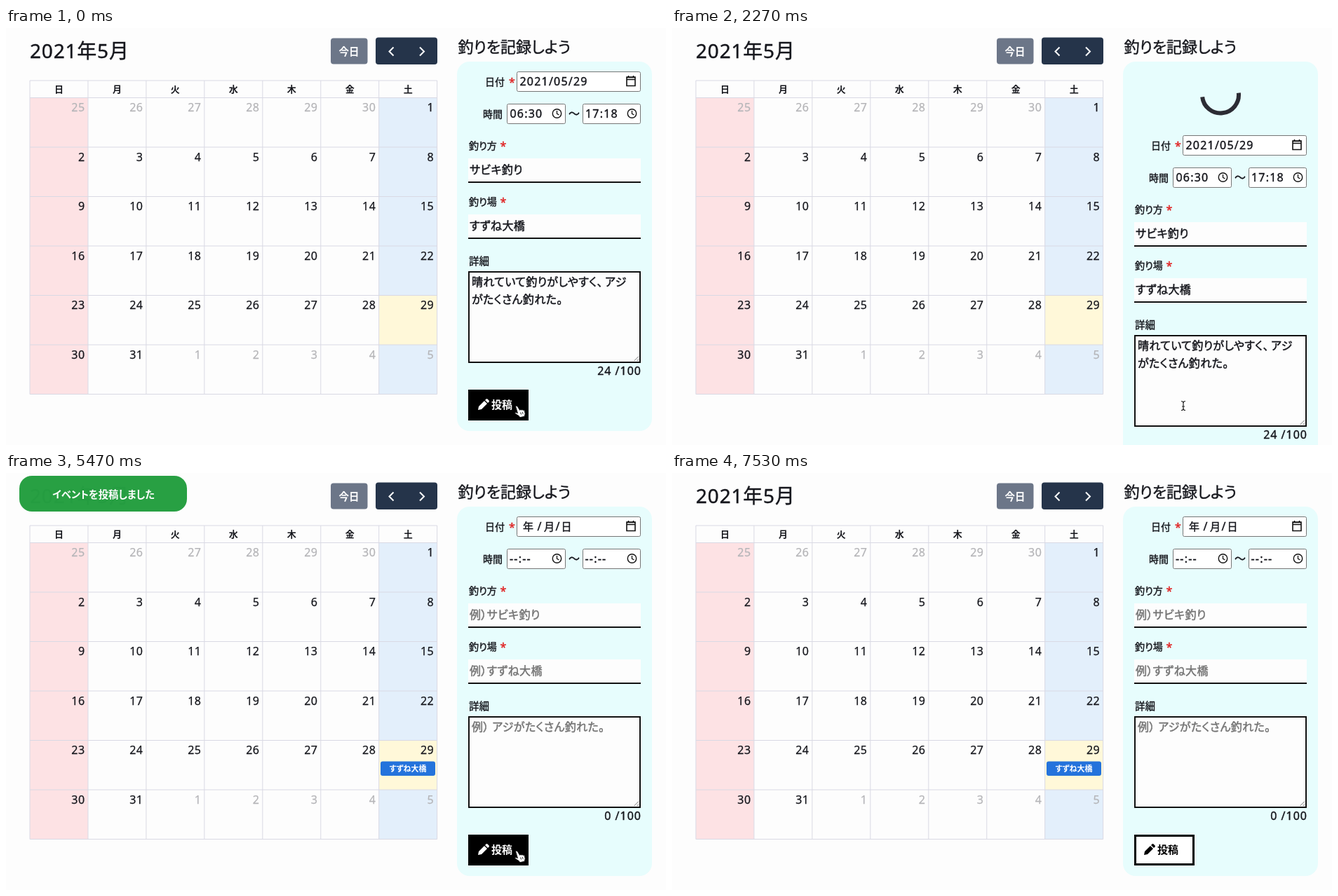
Recreate the animation shown at these times as an HTML page. Size 941 by 595 pixels, loop 7.56 s.

```html
<!DOCTYPE html>
<html lang="ja">
<head>
<meta charset="utf-8">
<style>
  html, body { margin: 0; width: 100%; height: 100%; overflow: hidden; background: #fdfdfd; }
  svg { display: block; width: 100%; height: 100%; color: #16171d; }
  text {
    font-family: "Noto Sans", "Noto Sans CJK JP", "Noto Sans CJK", sans-serif;
    font-feature-settings: "palt"; white-space: pre;
    fill: currentColor; stroke: currentColor; stroke-width: .4px;
  }
  .field { letter-spacing: .35px; stroke-width: .5px; }
  .wide { letter-spacing: 1.2px; }
  .count { letter-spacing: 1px; text-anchor: end; }
  .day { letter-spacing: .4px; text-anchor: end; stroke-width: .25px; }
  .grey { color: #757575; }
  .pale { color: #b5b5b8; }
  .red { color: #e02020; }
  .bold { font-weight: 700; stroke: none; }
  .middle { text-anchor: middle; }
  .white { color: #fff; }
</style>
</head>
<body>
<svg id="stage" viewBox="0 0 941 595"></svg>
<script>
const LOOP = 7560, LOAD = 1150, DONE = 3400, EVENT = 4300, FADE = 5340, FADE_MS = 1600, LEAVE = 6400;
const PLACE = 'すずね大橋';

const text = (x, y, size, str, cls = '') =>
  `<text x="${x}" y="${y}" font-size="${size}" class="${cls}">${str}</text>`;
const rect = (x, y, w, h, fill, attrs = '') =>
  `<rect x="${x}" y="${y}" width="${w}" height="${h}" fill="${fill}" ${attrs}/>`;
const line = (d, color, width) =>
  `<path d="${d}" fill="none" stroke="${color}" stroke-width="${width}"/>`;
const group = (id, body) => `<g id="${id}">${body}</g>`;
const onColor = 'white bold middle';

function calendar() {
  const left = 34, top = 99.5, colW = 82.95, rowH = 70.5;
  const right = left + 7 * colW, bottom = top + 6 * rowH;
  let out = rect(left, top, colW, 6 * rowH, '#fde2e4') +
    rect(left + 6 * colW, top, colW, 6 * rowH, '#e3effb') +
    rect(left + 6 * colW, top + 4 * rowH, colW, rowH, '#fff8d9');
  let grid = `M${left} 75H${right}`;
  for (let r = 0; r < 7; r++) grid += `M${left} ${top + r * rowH}H${right}`;
  for (let c = 0; c < 8; c++) grid += `M${left + c * colW} 75V${bottom}`;
  out += line(grid, '#d9d9e4', 1);
  [...'日月火水木金土'].forEach((day, c) =>
    out += text(left + (c + .5) * colW, 92, 13, day, 'bold middle'));
  for (let i = 0; i < 42; i++) {
    const day = i < 6 ? 25 + i : i < 37 ? i - 5 : i - 36;
    const other = i < 6 || i > 36;
    out += text(left + (i % 7 + 1) * colW - 4.5, top + Math.floor(i / 7) * rowH + 19.5, 16, day,
      other ? 'day pale' : 'day');
  }
  return out;
}

function toolbar() {
  return `<g letter-spacing=".8">${text(34, 43, 28, '2021年5月')}</g>` +
    rect(463, 14.5, 52.5, 37, '#6c7688', 'rx="4"') + text(489, 38.5, 14.5, '今日', onColor) +
    rect(527, 13.5, 88, 38.5, '#25344a', 'rx="4"') +
    line('M552.5 27.5L546.5 33.5L552.5 39.5M590 27.5L596 33.5L590 39.5', '#fff', 2);
}

const star = (x, y) => text(x, y, 16, '*', 'red');
const box = (x, y, w) => rect(x, y, w, 28, '#fff', 'rx="2" stroke="#767676"');
const clock = x => `<circle cx="${x}" cy="122" r="6.2" fill="none" stroke="#111" stroke-width="1.4"/>` +
  line(`M${x} 118V122.3L${x + 3} 124`, '#111', 1.3);
const underlined = y => rect(659, y, 246, 34, '#fdfdfd') + rect(659, y + 33, 246, 2, '#111');

function form() {
  const labels = text(683, 82, 14, '日付') + star(717, 83) +
    text(680, 127.5, 14, '時間') + text(802, 128, 16, '〜') +
    text(660, 173, 14, '釣り方') + star(704.5, 174) +
    text(660, 253, 14, '釣り場') + star(704.5, 254) +
    text(660, 338, 14.5, '詳細');
  const fields = box(728.5, 62.5, 176) + box(714.5, 108.5, 83) + box(822.5, 108.5, 82) +
    line('M885 70.5h12v12h-12zM885 70h12v3.5h-12zM887.5 68v3M894.5 68v3', '#111', 1.6) +
    clock(785.5) + clock(892.5) + underlined(186) + underlined(266) +
    rect(660, 348, 244, 129, '#fdfdfd', 'stroke="#111" stroke-width="2"') +
    line('M895.5 475L902 468.5M899.5 475L902 472.5', '#777', 1);
  const filled = text(732.5, 82, 16, '2021/05/29', 'wide') +
    text(718.5, 128, 16, '06:30', 'wide') + text(826, 128, 16, '17:18', 'wide') +
    text(661, 208, 16, 'サビキ釣り', 'field') + text(661, 288, 16, PLACE, 'field') +
    text(664, 368, 16, '晴れていて釣りがしやすく、\u2009アジ', 'field') +
    text(664, 393, 16, 'がたくさん釣れた。', 'field') +
    text(906, 495, 16, '24 /100', 'count');
  const empty = text(737, 82, 15, '年') + text(757.5, 82, 16, '/') + text(767, 82, 15, '月') +
    text(783.5, 82, 16, '/') + text(791.5, 82, 15, '日') +
    text(718, 128, 16, '--:--', 'wide') + text(825.5, 128, 16, '--:--', 'wide') +
    text(661, 208, 16, '例）サビキ釣り', 'field grey') + text(661, 288, 16, '例）' + PLACE, 'field grey') +
    text(664, 368, 16, '例） アジがたくさん釣れた。', 'field grey') +
    text(906, 495, 16, '0 /100', 'count');
  const button = rect(660.5, 517.5, 83, 41, '#fff', 'id="face" stroke="#000" stroke-width="3"') +
    group('caption', '<path fill="currentColor" d="M673 545l1-5 8-8 4 4-8 8zM683 531l1.5-1.5q1-1 2 0l2 2q1 1 0 2L687 535z"/>' +
      text(692, 543, 15, '投稿', 'bold'));
  return rect(643, 48, 278, 527, '#e7fdfd', 'id="panel" rx="18"') +
    group('form', labels + fields + group('filled', filled) + group('empty', empty) + button);
}

const event = rect(534, 411.5, 78, 20.5, '#2473dc', 'rx="3"') + text(573, 426, 11, PLACE, onColor);
const toast = rect(19, 4, 239, 51, '#259f41', 'rx="18"') + text(139, 35.5, 14.3, 'イベントを投稿しました', onColor);
const hand = '<path d="M-1.5 1q1-2 3 0l3 5q1-1.5 2.5 0 1-1.2 2.5.3 1.5-.8 2 1l.8 4-1 4-6.5 1.5-2-2.5-5-3q-1-1.8 1-1.8l2.5.7z" fill="#fff" stroke="#111" stroke-width="1.1"/>' +
  line('M5.5 9.5l1.2 3M8 8.8l1.2 3', '#111', .9);
const arrow = '<path d="M0 0V15L3.5 11.7L6 17L8.5 16L6 10.8H11z" fill="#111" stroke="#fff"/>';
const beam = line('M726 532.5q3 0 3 2.5v8q0 2.5-3 2.5M732 532.5q-3 0-3 2.5M729 543q0 2.5 3 2.5M727 540h4', '#222', 1.2);

const stage = document.getElementById('stage');
stage.innerHTML = rect(0, 0, 941, 595, '#fdfdfd') + calendar() + toolbar() +
  text(644.5, 35, 22, '釣りを記録しよう') + form() +
  group('spinner', line('M0 -26A26 26 0 0 1 0 26', '#2c2c34', 6)) +
  group('event', event) + group('toast', toast) +
  group('hand', hand) + group('arrow', arrow) + group('beam', beam);

const set = (id, name, value) => document.getElementById(id).setAttribute(name, value);
const show = (id, on) => set(id, 'visibility', on ? 'visible' : 'hidden');

function draw(t) {
  const loading = t >= LOAD && t < DONE;
  set('form', 'transform', `translate(0 ${loading ? 91 : 0})`);
  set('panel', 'height', loading ? 618 : 527);
  show('filled', t < DONE);
  show('empty', t >= DONE);
  show('spinner', loading);
  set('spinner', 'transform', `translate(782 95.5) rotate(${182 + (t - 1530) * 360 / 1019})`);
  show('event', t >= EVENT);

  const fade = Math.min(1, Math.max(0, (t - FADE) / FADE_MS));
  set('toast', 'opacity', t < DONE ? 0 : (1 + Math.cos(Math.PI * fade)) / 2);

  // The pointer rests on the button, then speeds off the bottom edge.
  const u = Math.max(0, t - LEAVE) / 130;
  const x = 728 - 22 * u, y = 539 + 10 * u * u;
  const hover = !loading && y < 560;
  for (const id of ['hand', 'arrow']) set(id, 'transform', `translate(${x} ${y})`);
  show('hand', hover);
  show('arrow', y >= 560 && y < 600);
  show('beam', loading);
  set('face', 'fill', hover ? '#000' : '#fff');
  set('caption', 'color', hover ? '#fff' : '#000');
}

const start = performance.now();
function tick() {
  draw((performance.now() - start) % LOOP);
  requestAnimationFrame(tick);
}
tick();
</script>
</body>
</html>
```
